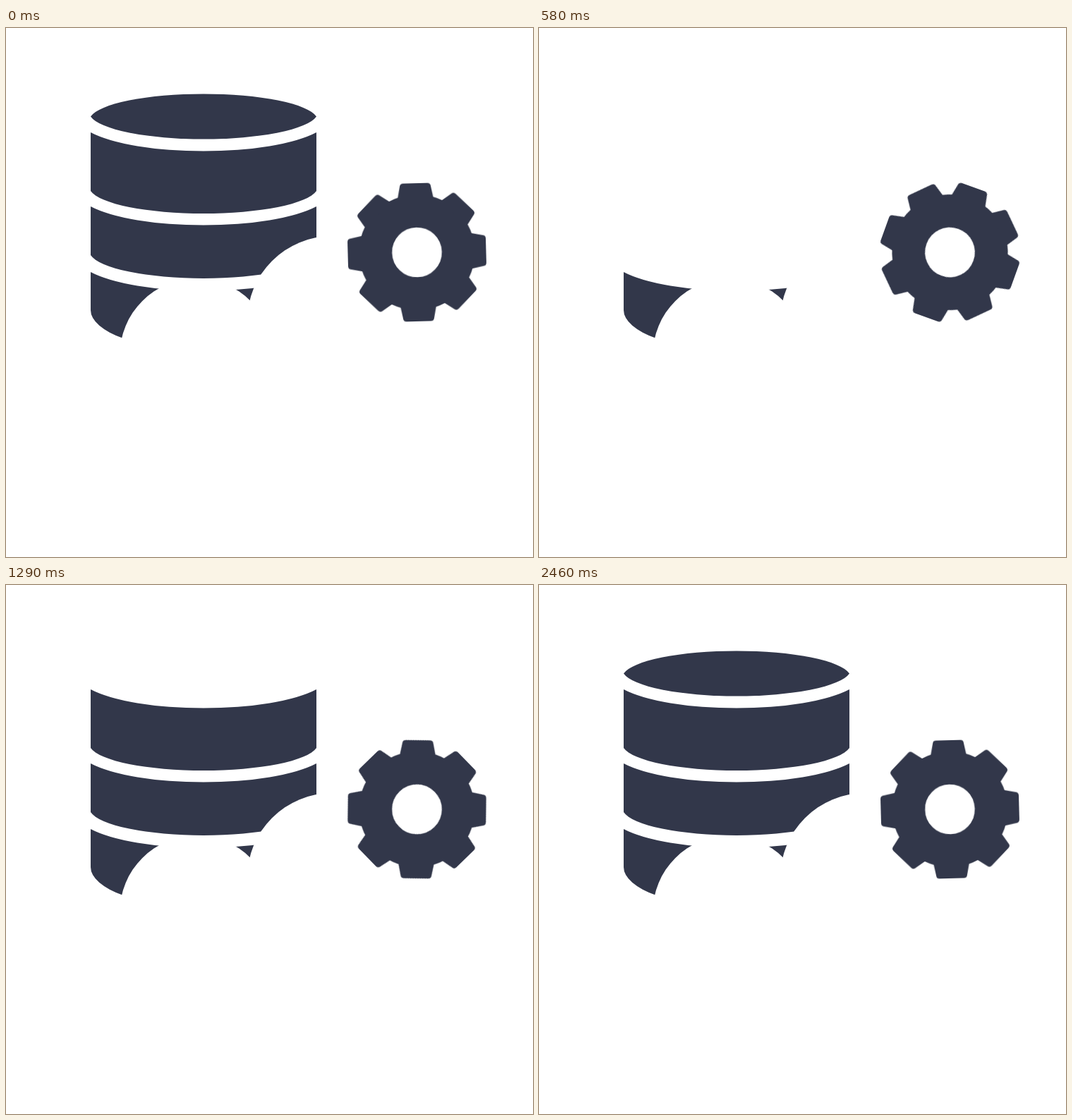
An HTML page without scripts for the animation above (2500 ms loop, 747 px wide and 750 px high).

```html
<!DOCTYPE html>
<html lang="en">
<head>
<meta charset="utf-8">
<title>Database and gear</title>
<style>
  html, body { margin: 0; width: 100%; height: 100%; overflow: hidden; background: #fff; }
  svg { display: block; width: 747px; height: 750px; fill: #32374a; }

  .disk, .gear { animation: 2.5s step-end -5ms infinite; }
  .base { animation-name: show-base; }
  .lower { animation-name: show-lower; }
  .upper { animation-name: show-upper; }
  .lid { animation-name: show-lid; }

  /* The full stack holds for one tick of 1/60, clears, then rebuilds from the bottom. */
  @keyframes show-base  { 0% { opacity: 1 } 1.667% { opacity: 0 } 8.333%, 100% { opacity: 1 } }
  @keyframes show-lower { 0% { opacity: 1 } 1.667% { opacity: 0 } 38.333%, 100% { opacity: 1 } }
  @keyframes show-upper { 0% { opacity: 1 } 1.667% { opacity: 0 } 50%, 100% { opacity: 1 } }
  @keyframes show-lid   { 0% { opacity: 1 } 1.667% { opacity: 0 } 73.333%, 100% { opacity: 1 } }

  /* 59 ticks make a quarter turn. */
  .gear { animation-name: turn; animation-timing-function: steps(60, end); }
  @keyframes turn { from { transform: rotate(-1.5254deg) } to { transform: rotate(90deg) } }
</style>
</head>
<body>
<svg viewBox="0 0 747 750">
  <defs>
    <path id="tooth" d="M-25.5-76 L-21.8-94.5 Q-21-98-17-98 H17 Q21-98 21.8-94.5 L25.5-76Z"/>
    <g id="teeth">
      <use href="#tooth"/>
      <use href="#tooth" transform="rotate(90)"/>
      <use href="#tooth" transform="rotate(180)"/>
      <use href="#tooth" transform="rotate(270)"/>
    </g>
  </defs>

  <path class="disk lid" d="M120 125.5 A162 38 0 0 1 440 125.5 A162 38 0 0 1 120 125.5Z"/>
  <path class="disk upper" d="M120 148 A180 49 0 0 0 440 148 V231 A162 38 0 0 1 120 231Z"/>
  <path class="disk lower" d="M120 253 A180 49 0 0 0 440 253 V322 A162 39 0 0 1 120 322Z"/>
  <path class="disk base" d="M120 346 A180 49 0 0 0 440 346 V400 A160 57 0 0 1 120 400Z"/>

  <g fill="#fff">
    <circle cx="270" cy="464" r="108.7"/>
    <circle cx="462" cy="415" r="120"/>
  </g>

  <g transform="translate(582.5 318)">
    <g class="gear">
      <circle r="58.7" fill="none" stroke="#32374a" stroke-width="46.8"/>
      <use href="#teeth"/>
      <use href="#teeth" transform="rotate(45)"/>
    </g>
  </g>
</svg>
</body>
</html>
```
